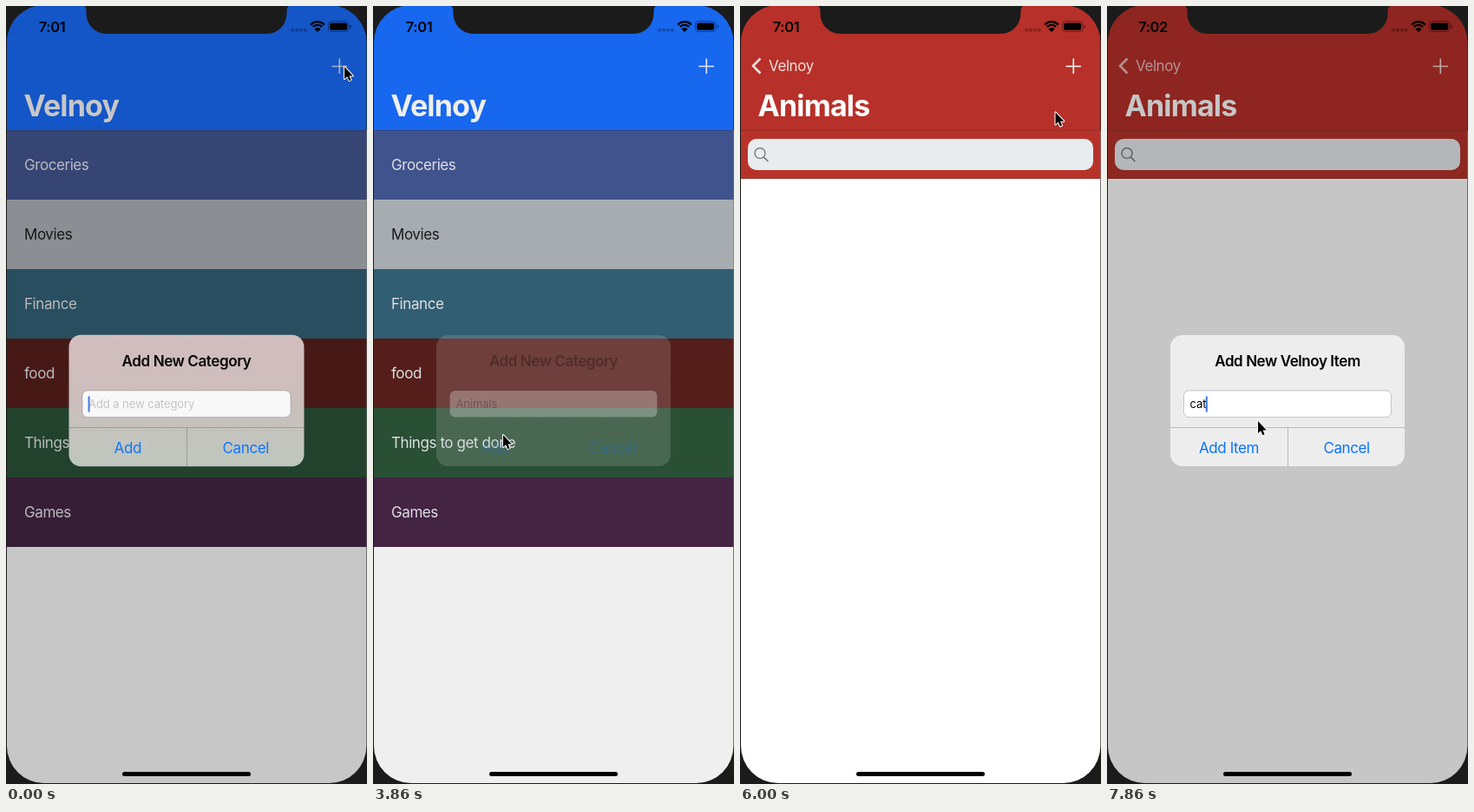
An HTML page with a canvas that plays this animation: 416 px wide and 896 px high, repeating every 8000 ms.

```html
<!DOCTYPE html>
<html lang="en">
<head>
<meta charset="utf-8">
<title>To-do list</title>
<style>
html, body { margin: 0; width: 100%; height: 100%; overflow: hidden; background: #1b1b1b; }
canvas { display: block; width: 416px; height: 896px; }
</style>
</head>
<body>
<canvas id="stage" width="416" height="896"></canvas>
<script>
const ctx = document.getElementById('stage').getContext('2d');
const LOOP = 8000;
const APP = 'Velnoy';
const BLUE = [25, 110, 255], RED = [183, 48, 41];
const DIM = 0.225;
const ROW_H = 80, BAR_H = 143;

const ROWS = [
  ['Groceries', '#455895'],
  ['Movies', '#b2b7bd'],
  ['Finance', '#34647a'],
  ['food', '#5b201c'],
  ['Things to get done', '#2c5439'],
  ['Games', '#472647'],
  ['Animals', '#b52f23']
];

// Pointer keys: time, x, y
const POINTER = [
  [0, 390, 70], [2700, 390, 70], [3250, 146, 498], [3600, 149, 494], [3900, 150, 494],
  [4350, 162, 500], [4600, 162, 500], [4880, 166, 636], [5600, 166, 636],
  [6100, 386, 64], [6600, 386, 64], [7000, 174, 478], [8000, 174, 478]
];

const clamp = v => Math.min(1, Math.max(0, v));
const mix = (a, b, k) => a + (b - a) * k;
const easeOut = (t, start, length) => 1 - (1 - clamp((t - start) / length)) ** 2;
const smooth = k => k * k * (3 - 2 * k);
const rgb = c => `rgb(${c.map(Math.round).join()})`;
const typed = (word, t, start, step) =>
  word.slice(0, Math.max(0, Math.floor((t - start) / step) + 1));

function fade(alpha, draw) {
  ctx.save();
  ctx.globalAlpha *= clamp(alpha);
  draw();
  ctx.restore();
}

function rect(x, y, w, h, color) {
  ctx.fillStyle = color;
  ctx.fillRect(x, y, w, h);
}

function pill(x, y, w, h, r, color) {
  ctx.beginPath();
  ctx.roundRect(x, y, w, h, r);
  ctx.fillStyle = color;
  ctx.fill();
}

function stroke(points, color, width) {
  ctx.beginPath();
  points.forEach(p => ctx.lineTo(...p));
  ctx.strokeStyle = color;
  ctx.lineWidth = width;
  ctx.stroke();
}

// y is the middle of the capital letters
function label(text, x, y, size, color, weight = 400, align = 'left') {
  ctx.font = `${weight} ${size}px Inter, sans-serif`;
  ctx.letterSpacing = `${size < 15 ? -0.1 : -0.025 * size}px`;
  ctx.textAlign = align;
  ctx.fillStyle = color;
  ctx.fillText(text, x, y + size * 0.363);
  return ctx.measureText(text).width;
}

function drawList(t, push) {
  const shift = -124 * push;
  rect(0, BAR_H, 416, 753, '#fff');
  const count = t < 4000 ? 6 : 7;
  ROWS.slice(0, count).forEach(([name, color], i) => {
    const y = BAR_H + i * ROW_H;
    const pressed = i === 6 && t > 4930;
    rect(0, y, 416, ROW_H, pressed ? '#c6a29d' : color);
    label(name, 21 + shift, y + 40, 17, i === 1 ? '#1d1d1d' : '#eceef2');
  });
  rect(0, BAR_H, 416, 753, `rgba(0,0,0,${0.1 * push})`);
}

function drawItems(x) {
  rect(x, BAR_H, 416, 753, '#fff');
  rect(x, BAR_H, 416, 56, '#b7332a');
  rect(x, 198.5, 416, 0.5, 'rgba(0,0,0,.3)');
  pill(x + 9, 153, 398, 36, 10, '#e8ecef');
  ctx.beginPath();
  ctx.arc(x + 23, 169.5, 6, 0, 7);
  ctx.strokeStyle = '#7b7e82';
  ctx.lineWidth = 1.5;
  ctx.stroke();
  stroke([[x + 27.3, 173.8], [x + 32.5, 179]], '#7b7e82', 1.7);
}

function drawBar(t, push, shown) {
  rect(0, 0, 416, BAR_H, rgb(BLUE.map((c, i) => mix(c, RED[i], push))));
  rect(0, BAR_H, 416, 0.5, 'rgba(0,0,0,.3)');

  const size = mix(34, 17, push), x = mix(20.5, 33, push), y = mix(115, 69, push);
  fade(1 - push * 2, () => label(APP, x, y, size, '#fff', 700));
  if (push > 0) {
    fade(mix(0, 0.85, push) * (1 - 0.2 * shown), () => label(APP, x, y, size, '#fff'));
    label('Animals', 20.5 + 470 * (1 - push), 115, 34, '#fff', 700);
    fade((push - 0.85) / 0.15 * (0.85 - 0.2 * shown), () =>
      stroke([[23.5, 60.5], [15, 69], [23.5, 77.5]], '#fff', 2.6));
  }

  const tapped = t > 6150 && t < 6550;
  fade(tapped ? 0.3 : 1 - 0.2 * shown, () => {
    stroke([[375.5, 69.5], [393, 69.5]], '#fff', 1.6);
    stroke([[384.3, 60.5], [384.3, 78]], '#fff', 1.6);
  });
}

function drawAlert(alert, shown, entering) {
  if (shown <= 0) return;
  const scale = 1.2 - 0.2 * entering;
  ctx.save();
  ctx.translate(208, 454.5);
  ctx.scale(scale, scale);
  ctx.translate(-208, -454.5);

  const fill = ctx.createLinearGradient(0, 379, 0, 530);
  alert.fill.forEach((c, i, all) => fill.addColorStop(i / (all.length - 1), c));
  fade(shown ** 1.25, () => pill(73, 379, 270, 151, 14, fill));

  fade(shown, () => {
    label(alert.title, 208, 408.5, 17, '#000', 600, 'center');
    // the field turns white late in the entrance
    fade(entering ** 5, () => pill(88.5, 443, 239, 30.5, 6, '#fff'));
    ctx.strokeStyle = 'rgba(60,60,60,.35)';
    ctx.lineWidth = 0.7;
    ctx.stroke();
    let width = 0;
    if (alert.text) width = label(alert.text, 95.5, 458.5, 13, '#000');
    else label(alert.hint, 95.5, 458.5, 13, '#c3c3c6');
    if (alert.caret) rect(95 + width, 449.5, 2, 18, '#3a78e8');
    rect(73, 485, 270, 0.7, 'rgba(60,60,67,.4)');
    rect(208, 485, 0.7, 45, 'rgba(60,60,67,.4)');
    label(alert.action, 140.5, 508.5, 17, '#0a74ff', 400, 'center');
    label('Cancel', 276, 508.5, 17, '#0a74ff', 400, 'center');
  });
  ctx.restore();
}

function drawStatus(t) {
  label(t < 7000 ? '7:01' : '7:02', 53, 24, 16.5, '#000', 600, 'center');
  for (let i = 0; i < 4; i++) pill(328.5 + i * 4.8, 26, 3.6, 3.6, 1.2, 'rgba(0,0,0,.28)');

  ctx.strokeStyle = '#000';
  ctx.lineWidth = 2.3;
  for (const r of [10.8, 7.2]) {
    ctx.beginPath();
    ctx.arc(359, 29, r, -Math.PI * 0.76, -Math.PI * 0.24);
    ctx.stroke();
  }
  ctx.beginPath();
  ctx.moveTo(359, 30);
  ctx.arc(359, 30, 5, -Math.PI * 0.76, -Math.PI * 0.24);
  ctx.fillStyle = '#000';
  ctx.fill();

  ctx.beginPath();
  ctx.roundRect(371.5, 17.7, 23.5, 11.8, 3.4);
  ctx.strokeStyle = 'rgba(0,0,0,.4)';
  ctx.lineWidth = 1;
  ctx.stroke();
  pill(373.2, 19.4, 20, 8.4, 2, '#000');
  pill(396.3, 21.7, 1.6, 4, 1, 'rgba(0,0,0,.4)');
}

function drawNotch() {
  ctx.beginPath();
  ctx.moveTo(86, -1);
  ctx.quadraticCurveTo(92.5, -1, 92.5, 6);
  ctx.arcTo(92.5, 32, 117, 32, 23);
  ctx.lineTo(300, 32);
  ctx.arcTo(323.5, 32, 323.5, 6, 23);
  ctx.lineTo(323.5, 6);
  ctx.quadraticCurveTo(323.5, -1, 330, -1);
  ctx.fillStyle = '#1b1b1b';
  ctx.fill();
}

function drawPointer(t) {
  const i = POINTER.findIndex(key => key[0] > t);
  const [t0, x0, y0] = POINTER[i - 1], [t1, x1, y1] = POINTER[i];
  const k = smooth((t - t0) / (t1 - t0));
  ctx.save();
  ctx.translate(mix(x0, x1, k), mix(y0, y1, k));
  ctx.beginPath();
  [[0, 0], [0, 14], [3.2, 11.2], [5.4, 16.2], [7.6, 15.2], [5.5, 10.4], [9.8, 10.4]]
    .forEach(p => ctx.lineTo(...p));
  ctx.closePath();
  ctx.lineJoin = 'round';
  ctx.strokeStyle = '#fff';
  ctx.lineWidth = 2;
  ctx.stroke();
  ctx.fillStyle = '#000';
  ctx.fill();
  ctx.restore();
}

function draw(t) {
  const push = easeOut(t, 5000, 505);
  const first = t < 5000;
  const leaving = smooth(clamp((t - 3600) / 400));
  const entering = first ? easeOut(t, -344, 400) : easeOut(t, 6250, 400);
  const shown = first ? entering * (1 - leaving) : entering;

  rect(0, 0, 416, 896, '#1b1b1b');
  ctx.save();
  ctx.beginPath();
  ctx.roundRect(1, -1, 414.4, 896, 43);
  ctx.clip();
  if (push < 1) drawList(t, push);
  if (push > 0) drawItems(Math.round(416 * (1 - push)));
  drawBar(t, push, shown);
  rect(0, 0, 416, 896, `rgba(0,0,0,${DIM * shown})`);

  const alert = first ? {
    title: 'Add New Category', hint: 'Add a new category', action: 'Add',
    text: typed('Animals', t, 900, 180), caret: t < 3600,
    fill: ['#d5c1c1', '#cfc2c0', '#c1cac1']
  } : {
    title: `Add New ${APP} Item`, hint: 'Create new item', action: 'Add Item',
    text: typed('cat', t, 7290, 200), caret: true,
    fill: ['#ededed', '#ededed']
  };
  drawAlert(alert, shown, entering);

  drawStatus(t);
  pill(134, 882, 148, 5, 2.5, '#000');
  ctx.restore();
  drawNotch();
  drawPointer(t);
}

const begin = performance.now();
function frame() {
  draw((performance.now() - begin) % LOOP);
  requestAnimationFrame(frame);
}
frame();
</script>
</body>
</html>
```
